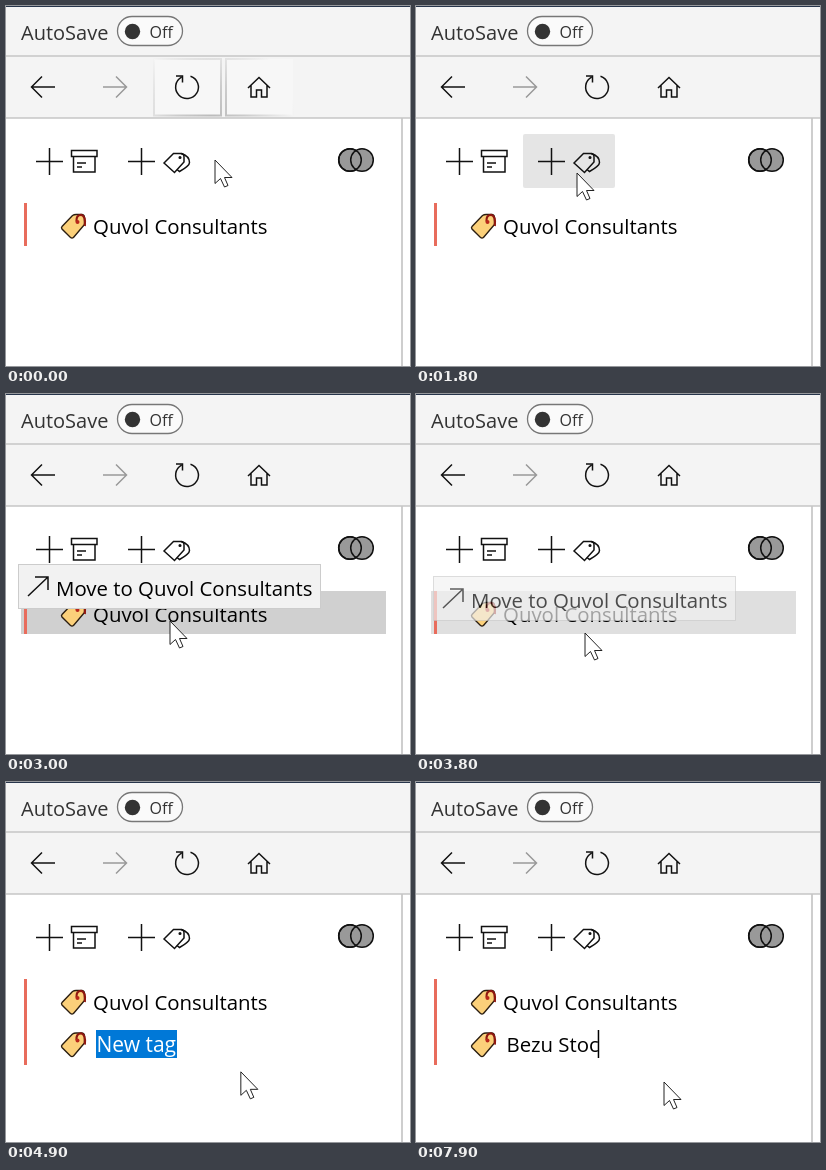
These frames come from a looping animation (404 by 360 pixels, 8000 ms). An HTML page:

```html
<!DOCTYPE html>
<html lang="en">
<head>
<meta charset="utf-8">
<style>
  html, body { margin: 0; width: 100%; height: 100%; overflow: hidden; background: #fff; }
  svg { display: block; width: 404px; height: 360px; }
  text { font: 20.4px "Open Sans", "Noto Sans", sans-serif; white-space: pre; }
  .line { fill: none; stroke: #111; stroke-width: 1.5; }
  .box { fill: #f2f2f2; stroke: #ccc; }
</style>
</head>
<body>
<svg viewBox="0 0 404 360">
  <defs>
    <radialGradient id="glow" gradientUnits="userSpaceOnUse" cx="205" cy="112" r="84">
      <stop offset="0" stop-color="#bbb"/>
      <stop offset=".4" stop-color="#ccc"/>
      <stop offset="1" stop-color="#ccc" stop-opacity="0"/>
    </radialGradient>
    <g id="addTag" class="line">
      <path d="M122 155.5H149M135.5 142V169"/>
      <path d="M158 157L167.500 147.500H175Q178 147.500 178 151V156L168.500 166.500Z"/>
      <path d="M175 147.500Q183.500 150 183.500 156.500Q183.500 160 173.500 165.500L171 163.500"/>
      <circle cx="174" cy="151.500" r=".8"/>
    </g>
    <g id="label">
      <path d="M56 220.500L66.500 209.500Q68 208.500 70 208.500H76Q78.500 209 78.500 212V218.500L67.500 231.500Q66 232.500 64.500 231.500L56 223Q55 221.500 56 220.500Z"
        fill="#fbd07a" stroke="#2a1d10" stroke-width="1.400"/>
      <path d="M70.500 215.500Q70 209 75 208.800Q80 210 78.800 220" fill="none" stroke="#8f1710" stroke-width="2.200"/>
      <circle cx="71.500" cy="216" r="2" fill="#b8251a"/>
    </g>
  </defs>

  <!-- Window chrome -->
  <rect width="404" height="112" fill="#f4f4f4"/>
  <rect width="404" height="1" fill="#26344a"/>
  <path d="M0 50H404M0 112H404M396 112V360" stroke="#c6c6c6" stroke-width="1.700"/>
  <text x="15" y="34" fill="#333" style="font-size:20px">AutoSave</text>
  <rect x="111.500" y="10.500" width="65" height="29" rx="14.500" fill="#fafafa" stroke="#777" stroke-width="1.300"/>
  <circle cx="126.500" cy="25.500" r="7.700" fill="#333"/>
  <text x="143.500" y="32" fill="#333" style="font-size:16px">Off</text>
  <g id="reveal" fill="#fff" fill-opacity=".25" stroke="url(#glow)" stroke-width="2">
    <rect x="148" y="53" width="67" height="56.500"/>
    <rect x="220" y="53" width="67" height="56.500"/>
  </g>
  <path class="line" d="M49 81H25.500M36 70.500L25.500 81L36 91.500"/>
  <path class="line" d="M97 81H120.500M110 70.500L120.500 81L110 91.500" style="stroke:#999"/>
  <path class="line" d="M184.500 70.300A11.400 11.400 0 1 1 175.500 71.200M170 70H176.500V76.500"/>
  <path class="line" d="M242 82L253 71.500L264 82M245 79.500V91H250.500V84H255.500V91H261V79.500"/>

  <!-- Panel -->
  <rect id="hover" x="107" y="128" width="92" height="54" rx="2" fill="#e5e5e5"/>
  <path class="line" d="M30 155.500H57M43.500 142V169M65.500 144.500H91V150.500H65.500ZM67.500 150.500V166H89V150.500M71 157H80M71 161H76"/>
  <use href="#addTag"/>
  <g fill="#999" stroke="#111" stroke-width="1.500">
    <circle cx="344" cy="154" r="11.300"/>
    <circle cx="356" cy="154" r="11.300"/>
    <circle cx="344" cy="154" r="11.300" fill="none"/>
  </g>
  <rect id="row" x="15" y="197" width="365" height="43" fill="#d0d0d0"/>
  <rect x="18" y="197" width="3" height="43" fill="#e86c5c"/>
  <use href="#label"/>
  <text class="firm" x="87" y="228"></text>

  <g id="newRow">
    <rect x="18" y="240" width="3" height="43" fill="#e86c5c"/>
    <use href="#label" y="42.500"/>
    <rect id="selection" x="90" y="248" width="81" height="28" fill="#0078d7"/>
    <text id="entry" x="90.500" y="270"></text>
    <rect id="caret" y="248" width="1.500" height="28"/>
  </g>

  <!-- Drag feedback -->
  <g id="ghost">
    <rect x="107" y="128" width="92" height="54" rx="2" opacity=".22"/>
    <use href="#addTag"/>
  </g>
  <g id="denied">
    <rect class="box" x="-19.500" y="-51.500" width="38" height="38"/>
    <path d="M-7.500 -39.500L6.500 -25.500M-10.500 -32.500a10 10 0 1 0 20 0a10 10 0 1 0 -20 0" fill="none" stroke="#e0352a" stroke-width="1.800"/>
  </g>
  <g id="tip">
    <rect class="box" x="-151.500" y="-56.500" width="302" height="44"/>
    <path class="line" d="M-142 -25L-122 -44M-135 -44H-122V-31"/>
    <text x="-114" y="-25">Move to <tspan class="firm"></tspan></text>
  </g>
  <path id="cursor" d="M0 0V23.500L5.500 18.500L9.500 27L13 25.500L9.500 17.500H17Z" fill="#fff" stroke="#222"/>
</svg>

<script>
const LOOP = 8000, STEP = 100;
const FIRM = "Quvol Consultants", TYPED = "Bezu Stoc";
const KEY_TIMES = [6000, 6200, 6400, 6600, 6900, 7200, 7400, 7600, 7800];
// time, x, y of the pointer tip
const PATH = [
  [600, 209, 154], [1200, 177, 154], [1500, 166, 154], [1800, 161, 167], [1900, 161, 167],
  [2400, 161, 197], [3000, 164, 227], [3300, 169, 239], [4400, 169, 239], [5000, 248, 300]
];
const $ = id => document.getElementById(id);
const clamp = v => Math.min(1, Math.max(0, v));
const show = (id, opacity) => $(id).setAttribute("opacity", Number(opacity));
const move = (id, x, y) => $(id).setAttribute("transform", `translate(${x} ${y})`);

document.querySelectorAll(".firm").forEach(node => node.textContent = FIRM);

function pointer(t) {
  const next = PATH.findIndex(p => p[0] > t);
  if (next === 0) return PATH[0].slice(1);
  if (next < 0) return PATH[PATH.length - 1].slice(1);
  const [t0, x0, y0] = PATH[next - 1], [t1, x1, y1] = PATH[next];
  const k = (t - t0) / (t1 - t0);
  return [x0 + (x1 - x0) * k, y0 + (y1 - y0) * k];
}

function render(t) {
  const [x, y] = pointer(t);
  const dragging = t >= 1900 && t <= 2400;
  const overRow = t > 2400 ? clamp((4000 - t) / 300) : 0;

  ["cursor", "denied", "tip"].forEach(id => move(id, x, y));
  move("ghost", x - 161, y - 167);
  show("reveal", t < 1600);
  show("hover", x < 199 && t < 1900);
  show("ghost", dragging);
  show("denied", dragging);
  show("row", overRow);
  show("tip", overRow);

  const count = KEY_TIMES.filter(k => k <= t).length;
  const entry = $("entry");
  show("newRow", clamp((t - 4200) / 400));
  show("selection", !count);
  show("caret", count > 0);
  entry.textContent = count ? TYPED.slice(0, count) : "New tag";
  entry.setAttribute("fill", count ? "#000" : "#fff");
  entry.style.fontSize = count ? "" : "21px";
  $("caret").setAttribute("x", 89.5 + entry.getComputedTextLength());
}

const start = performance.now();
function frame() {
  const t = (performance.now() - start) % LOOP;
  render(Math.floor(t / STEP) * STEP);
  requestAnimationFrame(frame);
}
frame();
</script>
</body>
</html>
```
